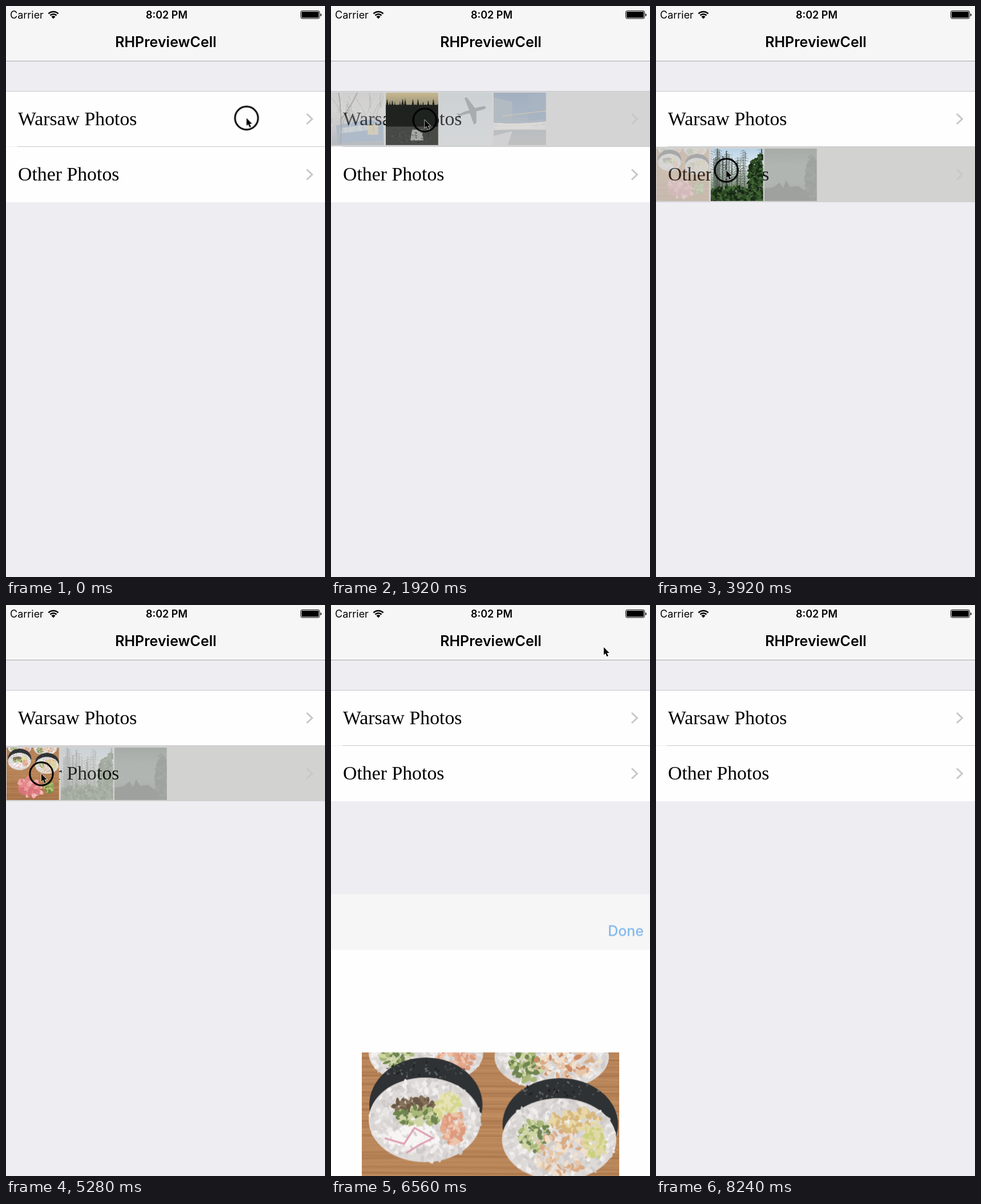
These frames come from a looping animation (559 px wide and 1001 px high, 8560 ms). An HTML page with a canvas:

```html
<!DOCTYPE html>
<html lang="en">
<head>
<meta charset="utf-8">
<title>RHPreviewCell</title>
<style>
  html, body { margin: 0; width: 100%; height: 100%; overflow: hidden; background: #eeedf2; }
  #stage { position: relative; width: 559px; height: 1001px; overflow: hidden; background: #eeedf2; font-family: Inter, Roboto, sans-serif; }
  #stage div, #stage svg, canvas { position: absolute; }
  svg { left: 0; top: 0; overflow: visible; }
  .bar { left: 0; top: 0; width: 559px; height: 97px; background: #f6f6f6; }
  .nav { box-sizing: border-box; border-bottom: 1px solid #a6a6aa; }
  .line { right: 0; height: 1px; background: #c8c7cc; }
  .row { left: 0; width: 559px; background: #fefefe; }
  .row text { font: 33.8px "Liberation Serif", serif; }
  .chevron { fill: none; stroke: #c7c7cc; stroke-width: 3; }
  .thumbs canvas { width: 92px; height: 92px; opacity: .27; }
  #modal { left: 0; top: 0; width: 559px; height: 1001px; background: #fefefe; }
  #modal canvas { left: 54px; top: 277px; width: 451px; height: 451px; }

  .row, .thumbs, .thumbs canvas, #modal, #done, #pointer, #ring { animation: 8.56s linear infinite; }
  #row1 { animation-name: shade1; }
  #row2 { animation-name: shade2; }
  #row1 .thumbs { animation-name: show1; }
  #row2 .thumbs { animation-name: show2; }
  #tram { animation-name: tram; }
  #lake { animation-name: lake; }
  #plane { animation-name: plane; }
  #night { animation-name: night; }
  #sushi { animation-name: sushi; }
  #birch { animation-name: birch; }
  #dusk { animation-name: dusk; }
  #modal { animation-name: slide; }
  #done { animation-name: done; }
  #pointer { animation-name: travel; }
  #ring { animation-name: press; animation-timing-function: step-end; }

  @keyframes shade1 { 0%, 4.66% { background: #fefefe } 4.67%, 27.1% { background: #d4d4d4 } 29%, 100% { background: #fefefe } }
  @keyframes shade2 { 0%, 40.18% { background: #fefefe } 40.19%, 64.5% { background: #d2d2d1 } 66.4%, 100% { background: #fefefe } }
  @keyframes show1 { 0%, 6% { opacity: 0 } 8.4%, 27.1% { opacity: 1 } 28.5%, 100% { opacity: 0 } }
  @keyframes show2 { 0%, 41.5% { opacity: 0 } 43.9%, 64.5% { opacity: 1 } 66%, 100% { opacity: 0 } }
  @keyframes tram { 0%, 19% { opacity: .27 } 20%, 21.4% { opacity: 1 } 22.6%, 100% { opacity: .27 } }
  @keyframes lake { 0%, 17.6% { opacity: .27 } 18.5%, 19% { opacity: 1 } 20%, 21.5% { opacity: .27 } 22.3%, 22.8% { opacity: 1 } 23.8%, 100% { opacity: .27 } }
  @keyframes plane { 0%, 16% { opacity: .27 } 17%, 17.6% { opacity: 1 } 18.6%, 22.7% { opacity: .27 } 23.4%, 23.8% { opacity: 1 } 24.6%, 100% { opacity: .27 } }
  @keyframes night { 0%, 13.2% { opacity: .27 } 14.02% { opacity: .42 } 14.9%, 16% { opacity: 1 } 17%, 23.6% { opacity: .27 } 24%, 24.6% { opacity: 1 } 25.5%, 100% { opacity: .27 } }
  @keyframes sushi { 0%, 57% { opacity: .27 } 58.5%, 100% { opacity: 1 } }
  @keyframes birch { 0%, 43% { opacity: .27 } 45%, 47% { opacity: 1 } 48.2%, 54.5% { opacity: .27 } 55.5%, 57% { opacity: 1 } 58.5%, 100% { opacity: .27 } }
  @keyframes dusk { 0%, 47% { opacity: .27 } 47.8%, 48.2% { opacity: 1 } 49.2%, 50.9% { opacity: .27 } 51.9%, 54.5% { opacity: 1 } 55.6%, 100% { opacity: .27 } }
  @keyframes slide {
    0%, 65% { transform: translateY(1001px) } 66.36% { transform: translateY(480px) }
    67.3% { transform: translateY(170px) } 69.2%, 75.2% { transform: translateY(0) }
    76.64% { transform: translateY(505px) } 77.6% { transform: translateY(820px) }
    79.4%, 100% { transform: translateY(1001px) }
  }
  @keyframes done { 0%, 73.8% { opacity: 1 } 74%, 74.8% { opacity: .3 } 76.64% { opacity: .5 } 79.4%, 100% { opacity: .8 } }
  @keyframes press {
    0% { opacity: 1 } 27.1% { opacity: 0 } 37.38% { opacity: 1 }
    64.49% { opacity: 0 } 73.83% { opacity: 1 } 75.2% { opacity: 0 } 99.99% { opacity: 0 }
  }
  @keyframes travel {
    0%, 10.3% { transform: translate(421.5px, 196.5px) }
    14.02% { transform: translate(369.5px, 197px) }
    16% { transform: translate(300px, 198px) }
    19.6%, 20.56% { transform: translate(60px, 200px) }
    22.4% { transform: translate(160px, 200px) }
    25.5%, 27.1% { transform: translate(485px, 202px) }
    31.78% { transform: translate(153px, 258px) }
    34.6%, 45.8% { transform: translate(123px, 288px) }
    47.66% { transform: translate(225px, 305px) }
    49.5% { transform: translate(485px, 325px) }
    51.4% { transform: translate(245px, 318px) }
    53.3% { transform: translate(232px, 312px) }
    58.9%, 64.5% { transform: translate(62px, 296px) }
    67% { transform: translate(92px, 275px) }
    73%, 83% { transform: translate(478px, 74px) }
    87%, 99.99% { transform: translate(545px, -30px) }
    100% { transform: translate(421.5px, 196.5px) }
  }
</style>
</head>
<body>
<div id="stage">
  <div class="bar nav"></div>
  <svg width="559" height="97"><text x="280" y="72" text-anchor="middle" font-size="25" font-weight="600">RHPreviewCell</text></svg>

  <div class="row" id="row1" style="top:150px;height:96px">
    <svg width="559" height="96"><text x="21" y="58.5">Warsaw Photos</text><path class="chevron" d="M527 39l9.5 9-9.5 9"/></svg>
    <div class="thumbs" style="top:2px">
      <canvas id="tram"></canvas><canvas id="lake"></canvas><canvas id="plane"></canvas><canvas id="night"></canvas>
    </div>
  </div>
  <div class="row" id="row2" style="top:247px;height:97px">
    <svg width="559" height="97"><text x="21" y="59">Other Photos</text><path class="chevron" d="M527 39.5l9.5 9-9.5 9"/></svg>
    <div class="thumbs" style="top:2.5px">
      <canvas id="sushi"></canvas><canvas id="birch"></canvas><canvas id="dusk"></canvas>
    </div>
  </div>
  <div class="line" style="top:149px;left:0"></div>
  <div class="line" style="top:246px;left:20px"></div>

  <div id="modal">
    <div class="bar"></div>
    <svg width="559" height="97"><text id="done" x="548" y="73" text-anchor="end" font-size="25" font-weight="500" fill="#0f7ce6">Done</text></svg>
    <canvas id="large"></canvas>
  </div>

  <svg width="559" height="30">
    <text x="7" y="22" font-size="18">Carrier</text>
    <text x="281.5" y="22" font-size="18" font-weight="600" text-anchor="middle">8:02 PM</text>
    <path d="M74.5 13.5a12 12 0 0 1 17 0M77.5 16.5a8 8 0 0 1 11 0" fill="none" stroke="#000" stroke-width="2.6"/>
    <path d="M83 22.5l-3.5-3.7a5 5 0 0 1 7 0z"/>
    <rect x="516.5" y="8.5" width="33" height="13.5" rx="2.5" fill="none" stroke="#000"/>
    <rect x="518" y="10" width="30" height="10.5" rx="1"/>
    <path d="M551 13v5q1.8-.5 1.8-2.5t-1.8-2.5z"/>
  </svg>

  <svg id="pointer" width="1" height="1">
    <circle id="ring" r="20.2" fill="none" stroke="#000" stroke-width="3"/>
    <path d="M0 0v13.5l3-2.7 2.3 5.4 2.5-1-2.3-5.3h4.2z" stroke="#fff" stroke-width="1.2" paint-order="stroke"/>
  </svg>
</div>
<script>
const SIZE = 450;
const rng = seed => () => (seed = seed * 16807 % 2147483647) / 2147483647;

function fillSky(c, ...colors) {
  const sky = c.createLinearGradient(0, 0, 0, SIZE);
  colors.forEach((color, i) => sky.addColorStop(i / (colors.length - 1), color));
  c.fillStyle = sky;
  c.fillRect(0, 0, SIZE, SIZE);
}

function oval(c, x, y, rx, ry, color, turn = 0) {
  c.fillStyle = color;
  c.beginPath();
  c.ellipse(x, y, rx, ry, turn, 0, 7);
  c.fill();
}

function shape(c, path, color) {
  c.fillStyle = color;
  c.fill(new Path2D(path));
}

function stroke(c, path, color, width) {
  c.strokeStyle = color;
  c.lineWidth = width;
  c.stroke(new Path2D(path));
}

// Scatters small ovals inside a larger one.
function scatter(c, rand, x, y, rx, ry, count, size, colors) {
  for (let i = 0; i < count; i++) {
    const a = rand() * 6.283, d = Math.sqrt(rand());
    oval(c, x + rx * d * Math.cos(a), y + ry * d * Math.sin(a),
      size * (.6 + rand()), size * (.4 + rand() * .5), colors[Math.floor(rand() * colors.length)], rand() * 3);
  }
}

function roll(c, rand, x, y, rx, ry, fillings) {
  oval(c, x + 2, y - 26, rx + 1, ry + 9, '#2f3234');
  scatter(c, rand, x, y - ry - 12, rx * .7, 16, 50, 2, ['#4b4e50', '#66696b', '#1b1d1f']);
  oval(c, x, y, rx, ry, '#dedad8');
  scatter(c, rand, x, y, rx - 3, ry - 3, 380, 5, ['#f1efee', '#d8d4d3', '#e8e4e2', '#cfcbca']);
  for (const [dx, dy, w, h, ...colors] of fillings) scatter(c, rand, x + dx, y + dy, w, h, 80, 5, colors);
}

const cucumber = ['#a8b878', '#d1d6a5', '#6f8550'];
const salmon = ['#e5a98a', '#edc4ac', '#dd9a7e'];
const chicken = ['#e6c6a8', '#d9ab85', '#f0dfcc'];

function drawSushi(c) {
  const rand = rng(41);
  fillSky(c, '#b78358', '#b98659', '#a9744a');
  for (let y = 0; y < SIZE; y += 5) {
    c.globalAlpha = .2 + rand() * .25;
    stroke(c, `M0 ${y}Q225 ${y + rand() * 12 - 6} 450 ${y + rand() * 6}`, rand() < .5 ? '#8c5b38' : '#d3a273', 2);
  }
  c.globalAlpha = 1;
  roll(c, rand, 112, 2, 100, 56, [[-50, 8, 28, 18, ...cucumber], [52, 14, 36, 18, ...salmon]]);
  roll(c, rand, 332, 8, 100, 58, [[-45, 16, 30, 26, ...cucumber], [28, 10, 58, 28, ...chicken, '#cf8a60']]);
  roll(c, rand, 110, 118, 98, 74, [
    [-18, -24, 36, 15, '#6b5846', '#857059'], [-12, -6, 42, 16, ...cucumber],
    [40, -24, 22, 22, '#d5d78f', '#e8e3b5'], [50, 14, 20, 28, ...salmon], [-20, 30, 45, 18, '#f8f5f5']]);
  stroke(c, 'M40 150l34 10 18-28 32 18-24 12-22 14', '#df9aab', 3);
  roll(c, rand, 345, 152, 100, 72, [
    [-42, -6, 26, 28, ...cucumber], [5, 24, 48, 38, ...chicken],
    [30, -32, 46, 20, '#d8b77d', '#e8d8a7'], [62, 5, 18, 28, '#cad17c', '#e2d9a5']]);
  scatter(c, rand, 205, 345, 95, 68, 50, 22, ['#ed9ca0', '#e58389', '#f4b6b4', '#d9737a']);
  scatter(c, rand, 150, 300, 40, 38, 14, 20, ['#f0a5a7', '#e5888c']);
  scatter(c, rand, 360, 340, 42, 42, 45, 14, ['#92a75b', '#b4c57b', '#758b43']);
}

function drawBirch(c) {
  const rand = rng(77);
  fillSky(c, '#b8d2e7', '#e6eef2', '#97aa91', '#39502f');
  for (let i = 0; i < 34; i++) {
    const x = rand() * SIZE, top = rand() * 150;
    stroke(c, `M${x} 420L${x + rand() * 14 - 7} ${top}`, rand() < .7 ? '#38413c' : '#828983', 2 + rand() * 6);
    for (let y = top; y < 320; y += 22) {
      const reach = 12 + rand() * 24;
      stroke(c, `M${x - reach} ${y + 12}L${x} ${y}l${reach} 14`, '#56625b', 2);
    }
  }
  const greens = ['#1c3419', '#2c4b23', '#426534', '#172716'];
  scatter(c, rand, 220, 400, 280, 75, 260, 17, greens);
  scatter(c, rand, 375, 260, 55, 165, 230, 15, greens);
  scatter(c, rand, 430, 190, 35, 150, 80, 14, greens);
}

function drawDusk(c) {
  const rand = rng(19);
  fillSky(c, '#33443a', '#5a685a', '#54655f', '#1a2721');
  scatter(c, rand, 200, 210, 190, 140, 100, 3, ['#75827a', '#4d5d55']);
  shape(c, 'M0 345L80 330 130 290 160 340 185 270 220 330 290 320 340 360 450 330V450H0z', '#121a16');
  scatter(c, rand, 405, 250, 50, 190, 170, 18, ['#1b2b23', '#14221b', '#25372e']);
}

function drawTram(c) {
  const rand = rng(5);
  fillSky(c, '#c9c8c5', '#d5d4cf', '#b6bac0', '#85909b');
  shape(c, 'M40 280L320 230 440 260V410L50 430z', '#6f90b5');
  shape(c, 'M70 305L320 270V320L70 350z', '#b9cbd9');
  shape(c, 'M310 270h90v90h-90z', '#d0c08f');
  for (let i = 0; i < 42; i++) {
    const x = rand() * SIZE, y = rand() * 260;
    stroke(c, `M${x} ${y + 120}q${rand() * 60 - 30}-60 ${rand() * 160 - 80}-140`, rand() < .6 ? '#7f7f7d' : '#ededeb', 2 + rand() * 3);
  }
  stroke(c, 'M75 450Q95 210 60 0M80 230Q170 110 220 0', '#686866', 10);
}

function drawLake(c) {
  const rand = rng(31);
  fillSky(c, '#c7b991', '#8c8773', '#55564e', '#595b5a');
  shape(c, 'M0 105H450V300H0z', '#20231f');
  for (let x = -10; x < 460; x += 22) {
    const y = 45 + rand() * 65;
    shape(c, `M${x} ${y}l32 180h-64z`, '#1f231f');
  }
  shape(c, 'M0 290H450V450H0z', '#484a46');
  shape(c, 'M225 315h85l12 95H212z', '#a5a7a4');
  scatter(c, rand, 225, 370, 220, 65, 80, 4, ['#73746f', '#343732']);
}

function drawPlane(c) {
  fillSky(c, '#b8c9d5', '#cbd8df', '#d8e0e3');
  shape(c, 'M145 175L180 180 205 165 255 150 215 45 235 40 305 132 370 116Q400 112 398 130 390 145 315 158L315 260 295 272 260 175 195 192 165 220 152 222 162 195z', '#35404a');
}

function drawNight(c) {
  fillSky(c, '#1f4f88', '#2d5f98', '#6f8198', '#8d8a86');
  shape(c, 'M0 40L160 80V270H0z', '#5b7893');
  shape(c, 'M300 20L450 0V230L300 240z', '#315f91');
  for (let i = 0; i < 4; i++) stroke(c, `M0 ${265 + i * 16}Q210 ${280 + i * 9} 450 ${255 + i * 18}`, i % 2 ? '#efe6d2' : '#f5f3ee', 14);
  stroke(c, 'M80 200L450 155', '#c4a65b', 6);
  shape(c, 'M0 370L160 330 120 450H0z', '#c9cbd0');
}

const photos = {
  tram: drawTram, lake: drawLake, plane: drawPlane, night: drawNight,
  sushi: drawSushi, birch: drawBirch, dusk: drawDusk, large: drawSushi
};
for (const [id, draw] of Object.entries(photos)) {
  const canvas = document.getElementById(id);
  canvas.width = canvas.height = SIZE;
  draw(canvas.getContext('2d'));
}
document.querySelectorAll('.thumbs').forEach(group =>
  [...group.children].forEach((canvas, i) => canvas.style.left = `${1 + i * 94.5}px`));
</script>
</body>
</html>
```
